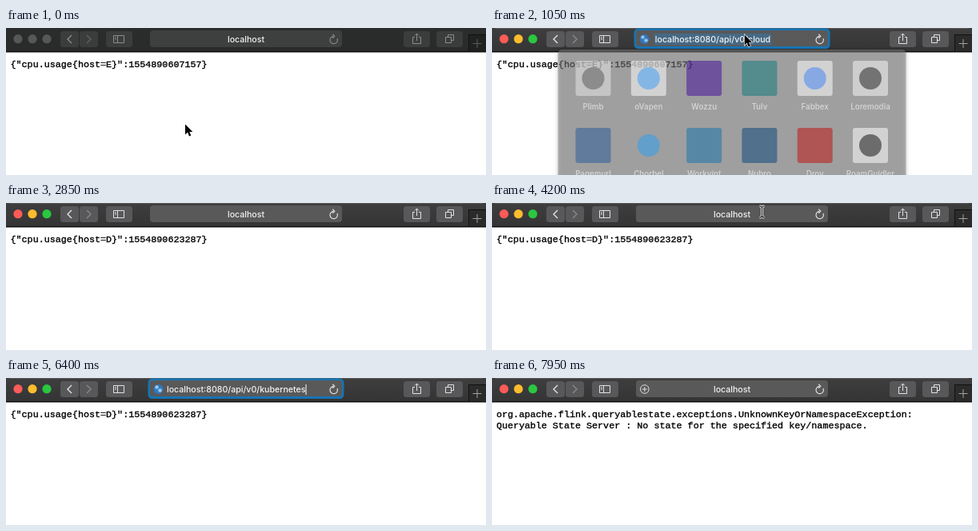
An HTML page with a canvas that plays this animation: 600x184 px, repeating every 8000 ms.

```html
<!DOCTYPE html>
<html lang="en">
<head>
<meta charset="utf-8">
<title>Querying state in a browser</title>
<style>
html, body { margin: 0; width: 100%; height: 100%; overflow: hidden; background: #fff; }
canvas { display: block; width: 600px; height: 184px; }
</style>
</head>
<body>
<canvas id="stage" width="600" height="184"></canvas>
<script>
const ctx = document.getElementById('stage').getContext('2d');
const LOOP = 8000;
const UI = 'Inter, Roboto, sans-serif';
const MONO = '"Liberation Mono", "DejaVu Sans Mono", monospace';
const URL_FONT = `450 10.6px ${UI}`;

const HOST = 'localhost', PATH = ':8080/api/v0/';
const FIELD = { x: 180, y: 3, w: 240, h: 21 };
const MID = 14;

const ACTIVATE = 740;
const CLOUD = { click: 800, enter: 1480, loaded: 2150 };
const KUBE = { click: 4330, enter: 6770, loaded: 7940 };
const EDITS = [CLOUD, KUBE];
const ERASE = 4920, TYPE = 5560, KEY = 90;
const RELOAD = { first: 2500, every: 500, lasts: 300, count: 3 };

const FAVOURITES = [
  { name: 'Plimb', tile: '#e6e6e6', mark: '#585858' },
  { name: 'oVapen', tile: '#fff', mark: '#3f9df5' },
  { name: 'Wozzu', tile: '#42109a' },
  { name: 'Tulv', tile: '#12797c' },
  { name: 'Fabbex', tile: '#fff', mark: '#4285f4' },
  { name: 'Loremodia', tile: '#f7f7f7', mark: '#222' },
  { name: 'Pagemurl', tile: '#2a5c9c' },
  { name: 'Chorbel', mark: '#2b9ff0' },
  { name: 'Workvint', tile: '#1673ad' },
  { name: 'Nubro', tile: '#0b467c' },
  { name: 'Drov', tile: '#bd1410' },
  { name: 'RoamGuidler', tile: '#fff', mark: '#111' }
];

const clamp = v => Math.max(0, Math.min(1, v));
const part = (t, from, span) => clamp((t - from) / span);
const ease = p => p * p * (3 - 2 * p);
const mix = (a, b, p) => a + (b - a) * p;
const within = (t, a, b) => t >= a && t < b;

function box(x, y, w, h, r, fill) {
  ctx.beginPath();
  ctx.roundRect(x, y, w, h, r);
  ctx.fillStyle = fill;
  ctx.fill();
}

function disc(x, y, r, fill) {
  ctx.beginPath();
  ctx.arc(x, y, r, 0, Math.PI * 2);
  ctx.fillStyle = fill;
  ctx.fill();
}

// Strokes an SVG path whose origin is moved to (x, y).
function trace(d, x, y, color, width = 1) {
  ctx.save();
  ctx.translate(x, y);
  ctx.strokeStyle = color;
  ctx.lineWidth = width;
  ctx.stroke(new Path2D(d));
  ctx.restore();
}

const plus = (x, y, r, color) => trace(`M${-r} 0H${r}M0 ${-r}V${r}`, x, y, color);
const chevron = (x, dir, color) => trace(`M${2.5 * dir} -5L${-2.5 * dir} 0L${2.5 * dir} 5`, x, MID, color, 1.4);

function label(text, x, y, font, color, align = 'left') {
  ctx.font = font;
  ctx.fillStyle = color;
  ctx.textAlign = align;
  ctx.fillText(text, x, y);
}

function faded(alpha, draw) {
  if (alpha <= 0) return;
  ctx.save();
  ctx.globalAlpha *= alpha;
  draw();
  ctx.restore();
}

function urlTail(t) {
  if (t < TYPE) return PATH + 'cloud'.slice(0, 5 - Math.ceil(part(t, ERASE, 5 * KEY) * 5));
  return PATH + 'kubernetes'.slice(0, Math.ceil((t - TYPE) / KEY));
}

// Progress of the page load under way, or null.
function loadProgress(t) {
  const edit = EDITS.find(e => within(t, e.enter + 40, e.loaded));
  if (edit) return part(t, edit.enter + 40, edit.loaded - edit.enter - 40);
  const since = t - RELOAD.first, phase = since % RELOAD.every;
  const reloading = within(since, 0, RELOAD.every * RELOAD.count) && phase < RELOAD.lasts;
  return reloading ? phase / RELOAD.lasts : null;
}

function drawPage(t) {
  ctx.fillStyle = '#fff';
  ctx.fillRect(0, 30, 600, 154);
  const result = t < 2750 ? ['E', 1554890607157] : ['D', 1554890623287];
  const lines = t < 7700
    ? [`{"cpu.usage{host=${result[0]}}":${result[1]}}`]
    : ['org.apache.flink.queryablestate.exceptions.UnknownKeyOrNamespaceException:',
       'Queryable State Server : No state for the specified key/namespace.'];
  ctx.strokeStyle = '#000';
  ctx.lineWidth = 0.35;
  lines.forEach((text, i) => {
    const y = 49 + i * 13.5;
    label(text, 5.5, y, `11.73px ${MONO}`, '#000');
    ctx.strokeText(text, 5.5, y);
  });
}

function drawToolbar(active, loading) {
  const shade = ctx.createLinearGradient(0, 0, 0, 30);
  shade.addColorStop(0, active ? '#3e3e3f' : '#2b2c2c');
  shade.addColorStop(1, active ? '#343435' : '#292a2a');
  box(0, 0, 600, 30, 0, shade);
  if (active) box(4, 0, 592, 1, 0, '#5a5a5b');
  box(0, 29, 600, 1.5, 0, '#0c0c0c');

  ['#fc5b57', '#fdbc2e', '#2ac740'].forEach((color, i) =>
    disc(15 + 18 * i, 13.7, 5.6, active ? color : '#565757'));

  const ink = active ? '#e2e2e2' : '#8b8b8b';
  const dim = active ? '#88888a' : '#606161';
  const key = (x, w) => box(x, 4, w, 20, 3.5, active ? '#58585a' : '#3b3c3c');
  key(68, 23);
  chevron(79.5, 1, ink);
  key(92, 23);
  chevron(103.5, -1, dim);
  key(125, 33);
  trace('M-6.5 -4.5h13v9h-13zM-1.5 -4.5v9M-5 -2h2M-5 0h2', 141, MID, ink);
  key(497, 33);
  trace('M-2.5 -2.5H-5v8H5v-8H2.5M0 2V-7M-2.5 -4.5L0 -7L2.5 -4.5', 513.5, MID, loading ? dim : ink);
  key(538, 33);
  trace('M-5 -2.5h7v7h-7zM-2 -2.5v-3h7v7h-3', 554.5, MID, ink);

  box(578, 8, 22, 22, 0, '#111');
  box(579, 9, 21, 20, 0, active ? '#2b2b2c' : '#202121');
  plus(589, 19.5, 5.5, active ? '#a2a2a2' : '#5c5c5c');
}

function drawGlobe() {
  disc(190.5, MID, 6, '#2e78c4');
  disc(188.5, MID - 2.5, 2.2, '#9cc9e8');
  disc(192.5, MID + 1.5, 2.3, '#9cc9e8');
}

function drawAddButton() {
  trace('M5.3 0A5.3 5.3 0 1 1 -5.3 0A5.3 5.3 0 1 1 5.3 0', 190.8, MID, '#e2e2e2');
  plus(190.8, MID, 3, '#e2e2e2');
}

function drawField(t, active, progress) {
  const { x, y, w, h } = FIELD;
  const edit = EDITS.find(e => within(t, e.click, e.enter));
  const loading = progress !== null;
  if (edit) box(x - 2.5, y - 2.5, w + 5, h + 4.5, 5.5, '#1674b4');
  box(x, y, w, h - (edit ? 1 : 0), 4, active ? '#59595a' : '#3e3f3f');
  if (loading) box(x + 1, 22, w * progress ** 1.5, 2, 1, '#1d93dc');

  // 0: host centred, 1: full address on the left
  const slide = EDITS.reduce((sum, e) =>
    sum + ease(part(t, e.click + 30, 250)) - ease(part(t, e.enter + 10, 300)), 0);
  const tail = urlTail(t);
  ctx.font = URL_FONT;
  const hostWidth = ctx.measureText(HOST).width;
  const tailWidth = ctx.measureText(tail).width;
  const textX = mix(300 - hostWidth / 2, 201, slide);
  const selected = edit && t < edit.click + 520 + 160 * (edit === CLOUD);

  if (selected) {
    faded(part(slide, 0.5, 0.5), () =>
      box(textX - 1, 7, hostWidth + tailWidth + 2, 14, 0, '#456a89'));
  }
  label(HOST, textX, 18, URL_FONT, loading && slide > 0 ? '#cfcfcf' : '#f4f4f4');
  faded(clamp(slide * 1.5), () =>
    label(tail, textX + hostWidth, 18, URL_FONT, edit ? '#f4f4f4' : '#a5a5a6'));
  faded(part(slide, 0.6, 0.4), drawGlobe);
  if (edit && !selected) box(textX + hostWidth + tailWidth, 8, 1, 13, 0, '#fff');

  const hover = EDITS.reduce((sum, e) =>
    sum + part(t, e.click - 100, 60) * (1 - part(t, e.click, 70)), 0);
  faded(t >= KUBE.loaded ? 1 : Math.max(hover, 0), drawAddButton);

  if (loading) trace('M-4 -4L4 4M4 -4L-4 4', 410, MID, '#dcdcdc', 1.3);
  else trace('M4.5 -1.4A4.7 4.7 0 1 1 0 -4.2M-1.3 -6.7L1.3 -4.2L-1.3 -1.8', 409.5, 14.5,
    active ? '#dedede' : '#858585', 1.2);
}

function drawFavourites() {
  ctx.save();
  ctx.shadowColor = 'rgba(0,0,0,.45)';
  ctx.shadowBlur = 5;
  box(82.5, 27, 435, 170, 5, '#808080');
  ctx.restore();
  FAVOURITES.forEach(({ name, tile, mark }, i) => {
    const x = 126.5 + 69.3 * (i % 6), y = 63 + 84 * Math.floor(i / 6);
    if (tile) box(x - 22, y - 22, 44, 44, 3, tile);
    if (mark) disc(x, y, 14, mark);
    label(name, x, y + 39, `600 9.7px ${UI}`, '#fff', 'center');
  });
}

function drawArrow(x, y) {
  const shape = new Path2D('M0 0V13L3 10L5 15L7.3 14L5.3 9.4H9.3Z');
  ctx.save();
  ctx.translate(x, y);
  ctx.strokeStyle = '#fff';
  ctx.lineWidth = 1.2;
  ctx.stroke(shape);
  ctx.fillStyle = '#000';
  ctx.fill(shape);
  ctx.restore();
}

function drawBeam(x, y) {
  const shape = 'M-3 -7Q0 -7 0 -5Q0 -7 3 -7M0 -5V5M-3 7Q0 7 0 5Q0 7 3 7';
  trace(shape, x, y, '#f2f2f2', 3);
  trace(shape, x, y, '#111', 1.1);
}

function drawPointer(t) {
  if (t < 1350) {
    const p = ease(part(t, 440, 280));
    drawArrow(mix(224, 315.7, p), mix(120.5, 8.5, p));
  } else if (within(t, 4050, 4880)) {
    drawBeam(mix(318, 337.5, ease(part(t, 4050, 140))), 11);
  }
}

function draw(t) {
  const active = t >= ACTIVATE;
  const progress = loadProgress(t);
  drawPage(t);
  drawToolbar(active, progress !== null);
  const opened = part(t, CLOUD.click + 140, 210) - part(t, CLOUD.enter - 40, 140)
    + part(t, KUBE.click + 140, 210) - part(t, ERASE + KEY, 140);
  faded(opened, drawFavourites);
  drawField(t, active, progress);
  drawPointer(t);
}

const start = performance.now();
function tick() {
  draw((performance.now() - start) % LOOP);
  requestAnimationFrame(tick);
}
tick();
</script>
</body>
</html>
```
